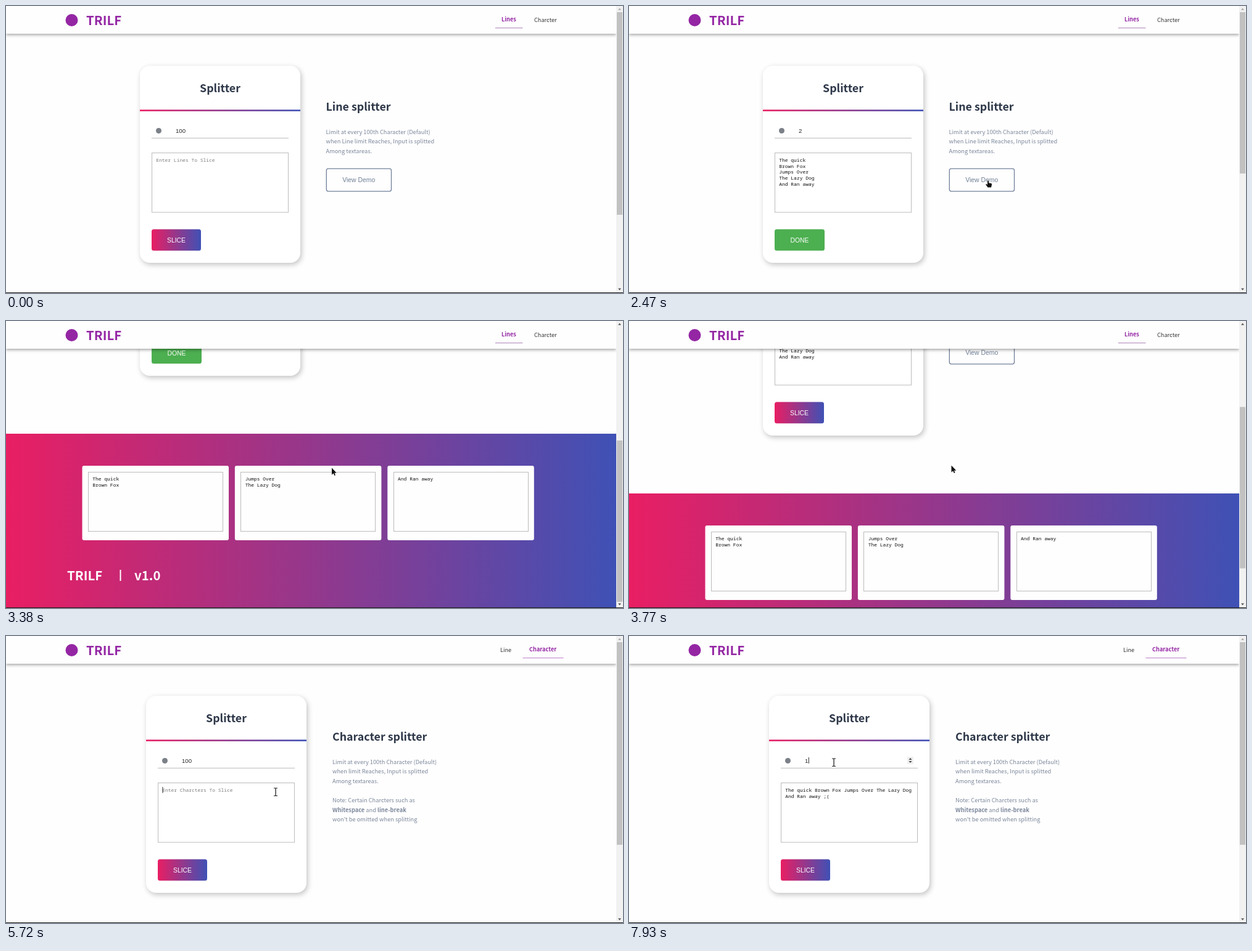
Write an HTML page with a canvas that moves like this. It is 1000 px wide and 466 px high and loops after 8 s.

```html
<!DOCTYPE html>
<html lang="en">
<head>
<meta charset="utf-8">
<title>Line tool demo</title>
<style>
html, body { margin: 0; width: 100%; height: 100%; overflow: hidden; background: #fefefe; }
canvas { display: block; width: 1000px; height: 466px; }
</style>
</head>
<body>
<canvas id="stage"></canvas>
<script>
const W = 1000, H = 466, LOOP = 8000, STEP = 130;
const canvas = document.getElementById('stage');
const ctx = canvas.getContext('2d');
const dpr = window.devicePixelRatio || 1;
canvas.width = W * dpr;
canvas.height = H * dpr;

const PINK = '#e91e63', BLUE = '#3f51b5', PURPLE = '#9426a4';
const INK = '#2d3748', SLATE = '#7c879b', LINE = '#bcbcbc';
const SANS = '"Noto Sans CJK JP", "Noto Sans CJK SC", "Noto Sans CJK", sans-serif';
const ARIAL = '"Liberation Sans", sans-serif';
const MONO = '7.95px "Noto Sans Mono", monospace';
const BODY = `9.28px ${SANS}`, BODY_BOLD = `bold 9.28px ${SANS}`;
const NAV = `9.2px ${SANS}`, NAV_BOLD = `bold 9.2px ${SANS}`;
const TITLE = `bold 17.8px ${SANS}`, BRAND = `bold 20.4px ${SANS}`;
const BUTTON = `10.4px ${ARIAL}`, INPUT = `9.6px ${ARIAL}`;

const DEMO = ['The quick', 'Brown Fox', 'Jumps Over', 'The Lazy Dog', 'And Ran away'];
const PASTED = ['The quick Brown Fox Jumps Over The Lazy Dog', 'And Ran away ;('];

// Event times in ms
const ENTER = 650, DEMO_CLICK = 1690, DONE_END = 3770, SWITCH = 5070;
const FOCUS_AREA = 5720, PASTE = 6240, FOCUS_NUM = 6760;

const SCROLL = [
  [2600, 0], [2730, 53], [2860, 130], [2990, 213], [3120, 284], [3250, 328],
  [3640, 328], [3770, 231], [3900, 177], [4030, 177], [4160, 110], [4420, 0]
];
const POINTER = [
  [650, 690, 425], [1300, 582, 283], [2600, 582, 283], [2990, 528, 238.5],
  [3640, 528, 238.5], [3770, 522.5, 234.5], [4160, 522.5, 234.5], [4810, 866, 27],
  [5070, 866, 27], [5590, 437, 253], [6240, 437, 253], [6760, 332, 205]
];

// Linear interpolation through rows of [time, ...values]
function track(rows, t) {
  if (t <= rows[0][0]) return rows[0].slice(1);
  for (let i = 1; i < rows.length; i++) {
    const a = rows[i - 1], b = rows[i];
    if (t <= b[0]) {
      const k = (t - a[0]) / (b[0] - a[0]);
      return a.slice(1).map((v, j) => v + (b[j + 1] - v) * k);
    }
  }
  return rows[rows.length - 1].slice(1);
}

function rect(x, y, w, h, fill) {
  ctx.fillStyle = fill;
  ctx.fillRect(x, y, w, h);
}

function round(x, y, w, h, r, fill) {
  ctx.beginPath();
  ctx.roundRect(x, y, w, h, r);
  ctx.fillStyle = fill;
  ctx.fill();
}

function frame(x, y, w, h, color) {
  ctx.strokeStyle = color;
  ctx.lineWidth = 1;
  ctx.strokeRect(x + .5, y + .5, w - 1, h - 1);
}

function dot(x, y, r, fill) {
  ctx.beginPath();
  ctx.arc(x, y, r, 0, Math.PI * 2);
  ctx.fillStyle = fill;
  ctx.fill();
}

function poly(points, fill) {
  ctx.beginPath();
  points.forEach(([x, y]) => ctx.lineTo(x, y));
  ctx.closePath();
  ctx.fillStyle = fill;
  ctx.fill();
}

function text(str, x, y, font, color, align = 'left') {
  ctx.font = font;
  ctx.fillStyle = color;
  ctx.textAlign = align;
  ctx.fillText(str, x, y);
}

function lines(list, x, y, gap, font, color) {
  list.forEach((s, i) => text(s, x, y + i * gap, font, color));
}

function blend(x, w) {
  const g = ctx.createLinearGradient(x, 0, x + w, 0);
  g.addColorStop(0, PINK);
  g.addColorStop(1, BLUE);
  return g;
}

function shadow(color, blur = 0, dx = 0, dy = 0) {
  ctx.shadowColor = color;
  ctx.shadowBlur = blur * dpr;
  ctx.shadowOffsetX = dx * dpr;
  ctx.shadowOffsetY = dy * dpr;
}

function drawCard(x, s) {
  shadow('rgba(0,0,0,.24)', 9, 2, 3);
  round(x, 97, 260, 320, 16, '#fff');
  shadow('transparent');
  text('Splitter', x + 130, 139.7, TITLE, INK, 'center');
  rect(x, 168.3, 260, 2.6, blend(x, 260));

  const left = x + 19;
  dot(x + 30.5, 202.5, 4.5, '#7b8088');
  text(s.limit, x + 58, 205.5, INPUT, '#222');
  rect(left, 214, 222, 1, LINE);
  if (s.spinner) {
    rect(x + 224, 196, 10, 12, '#efefef');
    poly([[x + 226.5, 201], [x + 231.5, 201], [x + 229, 198]], '#444');
    poly([[x + 226.5, 203], [x + 231.5, 203], [x + 229, 206]], '#444');
  }

  frame(left, 238, 222, 97.5, LINE);
  if (s.input.length) lines(s.input, x + 26.3, 252.6, 9.9, MONO, '#111');
  else text(s.hint, x + 26.3, 252.6, MONO, '#7d7d7d');

  if (s.caret === 'num') {
    ctx.font = INPUT;
    rect(x + 58.5 + ctx.measureText(s.limit).width, 197, .9, 10, '#111');
  } else if (s.caret === 'area') {
    ctx.font = MONO;
    const n = s.input.length;
    const w = n ? ctx.measureText(s.input[n - 1]).width : 0;
    rect(x + 26.5 + w, 245 + Math.max(0, n - 1) * 9.9, .9, 10, '#222');
  }

  const bw = s.done ? 81 : 80;
  round(left, 362.4, bw, 34.8, 3.5, s.done ? '#4caf50' : blend(left, bw));
  text(s.done ? 'DONE' : 'SLICE', left + bw / 2, 383.8, BUTTON, '#fff', 'center');
}

function drawLineInfo() {
  text('Line splitter', 518.5, 169.7, TITLE, INK);
  lines(['Limit at every 100th Character (Default)',
    'when Line limit Reaches, Input is splitted',
    'Among textareas.'], 518.5, 207.5, 15.7, BODY, SLATE);
  ctx.beginPath();
  ctx.roundRect(519.3, 264.2, 105.2, 36.6, 3);
  ctx.strokeStyle = '#70809a';
  ctx.lineWidth = 1.3;
  ctx.stroke();
  text('View Demo', 571.7, 286.2, BUTTON, '#718096', 'center');
}

function drawCharInfo() {
  const x = 529;
  text('Character splitter', x, 169.7, TITLE, INK);
  lines(['Limit at every 100th Character (Default)',
    'when limit Reaches, Input is splitted',
    'Among textareas.', '',
    'Note: Certain Charcters such as', '',
    "won't be omitted when splitting"], x, 207.5, 15.65, BODY, SLATE);
  let pen = x;
  [['Whitespace', BODY_BOLD], [' and ', BODY], ['line-break', BODY_BOLD]].forEach(([s, font]) => {
    text(s, pen, 285.7, font, SLATE);
    pen += ctx.measureText(s).width;
  });
}

function drawOutput() {
  rect(0, 511, 989, 300, blend(0, 989));
  for (let i = 0; i < 3; i++) {
    const x = 123.5 + i * 247.4;
    round(x, 563, 237.5, 121, 3, '#fefefe');
    frame(Math.round(x + 9.5), 573, 219, 97, LINE);
    lines(DEMO.slice(i * 2, i * 2 + 2), x + 16.8, 587.4, 9.9, MONO, '#111');
  }
  text('TRILF', 99, 748.5, BRAND, '#fff');
  rect(184.5, 732, 2, 18, '#fff');
  text('v1.0', 208, 748.5, BRAND, '#fff');
}

function drawHeader(charPage) {
  shadow('rgba(0,0,0,.36)', 5, 0, 2);
  rect(0, -10, 989, 55, '#fefefe');
  shadow('transparent');
  dot(106.5, 23, 10, PURPLE);
  text('TRILF', 130, 30.6, BRAND, PURPLE);
  if (charPage) {
    text('Line', 801, 25.9, NAV, '#333');
    text('Character', 848, 25.2, NAV_BOLD, PURPLE);
    rect(837.5, 35, 66, 1.2, '#c68fd1');
  } else {
    text('Lines', 803, 25.2, NAV_BOLD, PURPLE);
    text('Charcter', 856, 25.9, NAV, '#333');
    rect(793, 35, 44.5, 1.2, '#b795c2');
  }
}

function drawScrollbar(scroll, long) {
  rect(989, 0, 11, H, '#f1f1f1');
  const size = long ? 262 : 329;
  rect(990, 10 + scroll / 328 * 184, 9, size, '#c1c1c1');
  poly([[992, 6.5], [997, 6.5], [994.5, 3.5]], scroll > 0 ? '#505050' : '#a3a3a3');
  poly([[992, 458.5], [997, 458.5], [994.5, 461.5]], '#505050');
  rect(0, 465, W, 1, '#1c1c1c');
}

function within(x, y, l, t, r, b) {
  return x >= l && x <= r && y >= t && y <= b;
}

function pointerKind(x, y, scroll, charPage) {
  if (y < 45) return within(x, y, 793, 10, 904, 36) ? 'hand' : 'arrow';
  const py = y + scroll, left = charPage ? 246 : 236;
  if (!charPage && within(x, py, 519, 264, 625, 301)) return 'hand';
  if (within(x, py, left, 192, left + 222, 214) ||
      within(x, py, left, 238, left + 222, 335)) return 'beam';
  return 'arrow';
}

function outlined(path) {
  ctx.lineJoin = 'round';
  ctx.strokeStyle = '#fff';
  ctx.lineWidth = 1.4;
  ctx.stroke(path);
  ctx.fillStyle = '#111';
  ctx.fill(path);
}

const ARROW = new Path2D('M0 0V11.2L2.6 8.8 4.3 12.6 6 11.8 4.4 8.2H7.8Z');
const HAND = new Path2D('M-1 .8Q0-.4 1 .8V4.2L5.2 5Q6.2 5.3 6 7L5 11.5H-.5L-3.6 7.2Q-3.8 5.6-2.4 6L-1 7.2Z');

function drawPointer(x, y, kind) {
  ctx.save();
  ctx.translate(x, y);
  if (kind === 'beam') {
    rect(-.6, -6, 1.3, 12.5, '#222');
    rect(-3, -6.5, 6, 1, '#222');
    rect(-3, 6, 6, 1, '#222');
  } else {
    outlined(kind === 'hand' ? HAND : ARROW);
  }
  ctx.restore();
}

function limitAt(t) {
  if (t < DEMO_CLICK) return '100';
  if (t < SWITCH) return '2';
  if (t < 7410) return '100';
  return t < 7540 ? '10' : '1';
}

function inputAt(t) {
  if (t < DEMO_CLICK) return [];
  if (t < SWITCH) return DEMO;
  return t < PASTE ? [] : PASTED;
}

function caretAt(t) {
  if (t >= FOCUS_NUM) return 'num';
  return t >= FOCUS_AREA ? 'area' : '';
}

function draw(time) {
  const t = Math.floor(time / STEP) * STEP;
  const charPage = t >= SWITCH;
  const hasOutput = t >= DEMO_CLICK && !charPage;
  const [scroll] = track(SCROLL, t);
  const [px, py] = track(POINTER, t);

  ctx.setTransform(dpr, 0, 0, dpr, 0, 0);
  rect(0, 0, W, H, '#fefefe');

  ctx.save();
  ctx.translate(0, -scroll);
  drawCard(charPage ? 227 : 217, {
    limit: limitAt(t),
    input: inputAt(t),
    caret: caretAt(t),
    hint: charPage ? 'Enter Charcters To Slice' : 'Enter Lines To Slice',
    done: t >= DEMO_CLICK && t < DONE_END,
    spinner: t >= FOCUS_NUM
  });
  if (charPage) drawCharInfo();
  else drawLineInfo();
  if (hasOutput) drawOutput();
  ctx.restore();

  drawHeader(charPage);
  drawScrollbar(scroll, hasOutput);
  if (t >= ENTER) drawPointer(px, py, pointerKind(px, py, scroll, charPage));
}

const start = performance.now();
function tick() {
  draw((performance.now() - start) % LOOP);
  requestAnimationFrame(tick);
}
tick();
</script>
</body>
</html>
```
